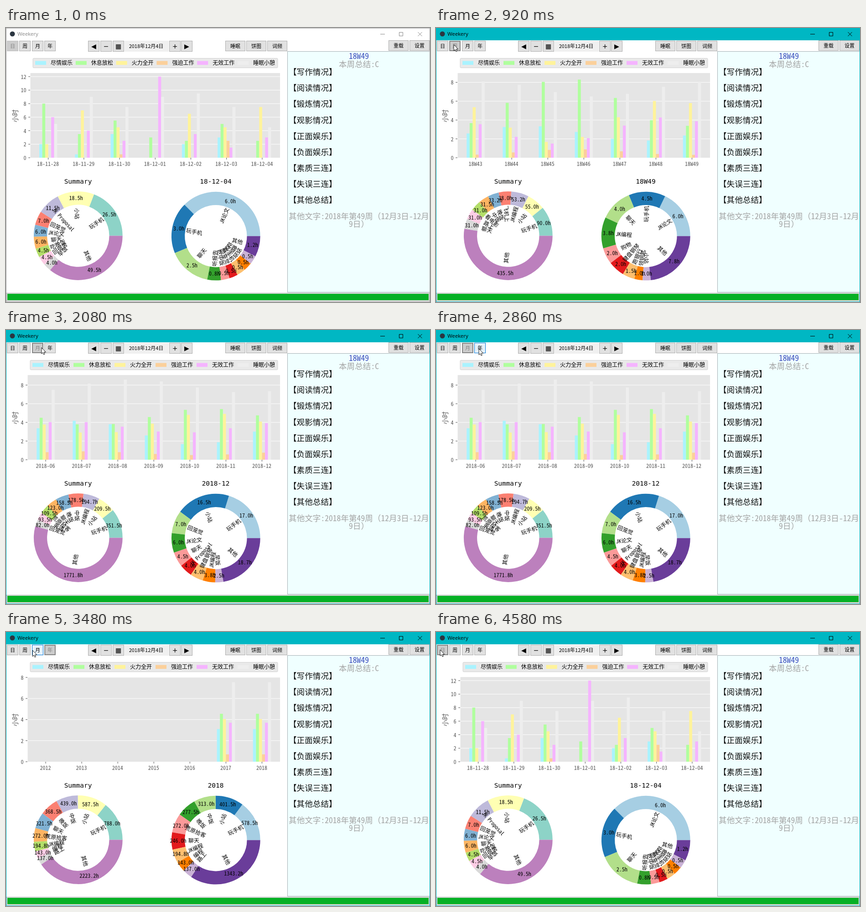
Recreate the animation shown at these times as an HTML page. Size 930 px wide and 602 px high, loop 5590 ms.

```html
<!DOCTYPE html>
<html lang="zh">
<head>
<meta charset="utf-8">
<title>Weekery</title>
<style>
html, body { margin: 0; width: 100%; height: 100%; overflow: hidden; background: #fff; }
svg { display: block; font-family: "Noto Sans Mono CJK SC", "Noto Sans CJK SC", sans-serif; }
.ui { font-family: "Noto Sans CJK SC", "DejaVu Sans", sans-serif; }
.thin { font-family: "Noto Sans CJK SC", sans-serif; font-weight: 300; }
.sym { font-family: "DejaVu Sans", sans-serif; }
.title { font-family: "Open Sans", sans-serif; }
.head { font-family: "DejaVu Sans Mono", monospace; }
</style>
</head>
<body>
<script>
const LOOP = 5590;
const BAR_COLORS = ['#aaf3ff', '#b0ff9e', '#fff39b', '#fbd09b', '#f5b4ff', '#eee'];
const KINDS = ['尽情娱乐', '休息放松', '火力全开', '强迫工作', '无效工作', '睡眠小憩'];
const SET3 = ['#8dd3c7', '#ffffb3', '#bebada', '#fb8072', '#80b1d3', '#fdb462', '#b3de69', '#fccde5', '#d9d9d9', '#bc80bd'];
const PAIRED = ['#a6cee3', '#1f78b4', '#b2df8a', '#33a02c', '#fb9a99', '#e31a1c', '#fdbf6f', '#ff7f00', '#cab2d6', '#6a3d9a'];

// Hours of each kind swing around a mean: [mean, swing, period of the peak]
const waves = list => i => list.map(([mean, swing, peak]) => mean + swing * Math.cos(i - peak));
const days = [[2, 8, 2, 0, 6, 5], [.5, 3.5, 7, 0, 4, 9], [3.5, 5.5, 4.5, .5, 2.5, 7.5], [0, 3, 0, 0, 12, 9],
  [2, 2.5, 6.5, 0, 3.5, 9.5], [3, 5, 4.5, 2.5, 1.5, 7.5], [0, 2.5, 7.5, 0, 3, 4.5]];
const weeks = waves([[2.6, .8, 1.6], [5.9, 2.6, 2.6], [3.9, 2.3, 5.4], [.6, .3, 2.7], [2.9, 1.4, 5.2], [7.3, .8, 0]]);
const months = waves([[2.9, 1.3, 1.2], [4.6, .9, 4.6], [3.9, 1.1, 4.6], [.7, .2, 1], [3.5, .6, .5], [7.9, .7, 2.2]]);
const years = i => i < 5 ? [] : [3.1, 4.55, 4.05, .7, 3.7, 7.55];

// One entry per view: day, week, month, year
const VIEWS = [
  {
    left: 53.5, unit: 14.85, bars: i => days[i],
    tick: i => '18-' + (i < 3 ? `11-${28 + i}` : `12-0${i - 2}`),
    total: '玩手机 26.5,小站 18.5,JK Proposal 11.5,回笼觉 7.0,JK论文 6.0,聊天 6.0,吃晚饭 4.5,回宿舍 4.5,早饭 4.0,其他 49.5',
    title: '18-12-04',
    part: 'JK论文 6.0,玩手机 3.0,聊天 2.5,听报告 0.8,吃中饭 0.5,回笼觉 0.5,看手机 0.5,吃早饭 0.5,吃晚饭 0.5,其他 1.2'
  },
  {
    left: 47.5, unit: 20.7, bars: weeks,
    tick: i => `18W${43 + i}`,
    total: '玩手机 90.0,小站 55.0,JK编程 53.2,飞机上 38.0,晚饭 33.2,中饭 31.5,看电影 31.0,路上 31.0,聊天 31.0,其他 435.5',
    title: '18W49',
    part: 'JK论文 6.0,玩手机 4.5,聊天 4.0,JK编程 3.8,购物 2.0,键盘钢琴 2.0,跑银行 1.5,领钥匙 1.0,小站 1.0,其他 7.8'
  },
  {
    left: 47.5, unit: 20.5, bars: months,
    tick: i => '2018-' + String(6 + i).padStart(2, 0),
    total: '玩手机 351.5,小站 209.5,JK编程 194.7,中饭 178.5,晚饭 158.5,聊天 123.0,荒原拾客 109.5,英语 93.5,回笼觉 82.0,其他 1771.8',
    title: '2018-12',
    part: '玩手机 17.0,小站 16.5,回笼觉 7.0,JK论文 6.0,聊天 4.5,JK Proposal 4.0,键盘钢琴 4.0,JK编程 3.8,早饭 2.5,其他 18.7'
  },
  {
    left: 47.5, unit: 23.15, bars: years,
    tick: i => 2012 + i,
    total: '玩手机 788.0,小站 587.5,中饭 439.0,晚饭 368.5,聊天 321.5,荒原拾客 272.0,JK编程 194.8,编程 143.0,路上 137.0,其他 2223.2',
    title: '2018',
    part: '玩手机 578.5,小站 401.5,中饭 313.0,晚饭 277.5,荒原拾客 272.0,聊天 246.0,JK编程 194.8,编程 143.0,路上 137.0,其他 1343.2'
  }
];

// Each click opens the next view: press, then bars, then pies
const CLICKS = [
  { press: 450, bars: 770, pies: 920 },
  { press: 1460, bars: 1620, pies: 1770 },
  { press: 2940, bars: 3100, pies: 3240 },
  { press: 4270, bars: 4420, pies: 4580 }
];
const clicksDone = (stage, t) => CLICKS.filter(c => c[stage] <= t).length;

// Pointer trips: start, end, goal
const TRIPS = [[70, 300, 39, 36.5], [1080, 1310, 66, 37], [2080, 2460, 94, 41], [3410, 3800, 9, 39]];
const STEP = 76;

function pointer(t) {
  let x = -2, y = 30;
  for (const [start, end, goalX, goalY] of TRIPS) {
    if (t < start) break;
    const steps = Math.floor((end - start) / STEP) + 1;
    const p = Math.min(1, (Math.floor((t - start) / STEP) + 1) / steps);
    const eased = 1 - (1 - p) ** 3;
    x += (goalX - x) * eased;
    y += (goalY - y) * eased;
  }
  return [x, y];
}

function el(tag, attrs, parent, content) {
  const node = document.createElementNS('http://www.w3.org/2000/svg', tag);
  for (const k in attrs) node.setAttribute(k, attrs[k]);
  if (content !== undefined) node.textContent = content;
  parent.append(node);
  return node;
}
const rect = (g, x, y, width, height, fill, more) => el('rect', { x, y, width, height, fill, ...more }, g);
const path = (g, d, more) => el('path', { d, fill: 'none', ...more }, g);

// Text centred vertically on y
function text(g, x, y, str, size, more) {
  return el('text', { x, y, dy: '.37em', 'font-size': size, 'text-anchor': 'middle', ...more }, g, str);
}

function button(x, y, w, h, label, size = 11, cls = 'ui') {
  const box = rect(svg, x + .5, y + .5, w - 1, h - 1, '#e1e1e1', { stroke: '#adadad' });
  const ring = rect(svg, x + 1.5, y + 1.5, w - 3, h - 3, 'none', { visibility: 'hidden' });
  const word = text(svg, x + w / 2, y + h / 2, label, size, { class: cls });
  return { x, w, box, ring, word };
}

function barChart({ left, unit, tick, bars }) {
  const g = el('g', {}, svg), base = 285, right = 601;
  const step = (right - left) / 7, w = step / 12;
  const grey = { fill: '#555' };

  rect(g, left + 5.5, 66.5, 590.5 - left, 21, '#e9e9e9', { stroke: '#d2d2d2', rx: 2 });
  KINDS.forEach((name, i) => {
    const x = 508 - (5 - i) * (left > 50 ? 88.8 : 90);
    rect(g, x, 72.5, 24, 8.5, BAR_COLORS[i]);
    text(g, x + 34, 77, name, 12, { 'text-anchor': 'start' });
  });

  rect(g, left, 99, right - left, base - 99, '#e5e5e5');
  for (let v = 0; v * unit <= 186; v += 2) {
    const y = base - v * unit;
    if (v) path(g, `M${left} ${y}H${right}`, { stroke: '#fff' });
    path(g, `M${left - 4.5} ${y}h4`, { stroke: '#555' });
    text(g, left - 9, y + .5, v, 12, { ...grey, 'text-anchor': 'end' });
  }
  for (let i = 0; i < 7; i++) {
    const x = left + (i + .5) * step;
    bars(i).forEach((v, k) => rect(g, x + (k - 3) * w, base - v * unit, w, v * unit, BAR_COLORS[k]));
    path(g, `M${x} ${base}v4`, { stroke: '#555' });
    text(g, x - .5, 298.5, tick(i), 12, grey);
  }
  return g;
}

function donut(g, cx, cy, title, slices, colors) {
  const items = slices.split(',').map(s => s.match(/(.+) (.+)/).slice(1));
  const sum = items.reduce((total, [, hours]) => total + +hours, 0), R = 97.4, r = 68.2;
  const point = (radius, a) => [cx + radius * Math.cos(a), cy - radius * Math.sin(a)];
  const labels = [];
  let a = 0;
  text(g, cx - .3, 337, title, 14.4, { class: 'head' });
  items.forEach(([name, hours], i) => {
    const size = hours / sum * 2 * Math.PI, b = a + size, mid = a + size / 2, big = +(size > Math.PI);
    path(g, `M${point(R, a)}A${R} ${R} 0 ${big} 0 ${point(R, b)}L${point(r, b)}A${r} ${r} 0 ${big} 1 ${point(r, a)}Z`,
      { fill: colors[i] });
    labels.push([name, point(48.5, mid), (Math.cos(mid) < 0 ? 180 : 0) - mid * 180 / Math.PI],
      [hours + 'h', point(82.8, mid), 0]);
    a = b;
  });
  for (const [str, [x, y], turn] of labels) text(g, x, y, str, 12, { transform: `rotate(${turn} ${x} ${y})` });
}

function pies(v) {
  const g = el('g', {}, svg);
  donut(g, 158.3, 456.5, 'Summary', v.total, SET3);
  donut(g, 460.3, 457.2, v.title, v.part, PAIRED);
  return g;
}

const svg = el('svg', { width: 930, height: 602, viewBox: '0 0 930 602' }, document.body);
rect(svg, 0, 0, 930, 602, '#fff');

// Title bar
const bar = rect(svg, 0, 0, 930, 27, '#fff');
el('circle', { cx: 14, cy: 13, r: 5.5, fill: '#2b3540' }, svg);
const caption = text(svg, 25, 13, 'Weekery', 11.4, { class: 'title', 'text-anchor': 'start' });
const controls = path(svg, 'M821 13.5h10M862.5 9.5h8v8h-8zM903.5 9l9 9m0-9l-9 9');

// Toolbar
const tabs = ['日', '周', '月', '年'].map((s, i) => button(Math.round(2 + 27.3 * i), 28, 25, 23, s));
[['◀', 180], ['−', 207], ['▦', 234], ['+', 358], ['▶', 384]].forEach(([s, x]) => button(x, 28, 25, 24, s, 14, 'sym'));
['睡眠', '饼图', '词频'].forEach((s, i) => button(481 + 46 * i, 28, 44, 23, s));
['重载', '设置'].forEach((s, i) => button(839 + 46 * i, 27, 44, 23, s));
rect(svg, 260, 28, 97, 24, '#f0f0f0');
text(svg, 307.5, 40, '2018年12月4日', 11, { class: 'ui' });

// Notes
rect(svg, 617.5, 51.5, 312, 529, '#f0ffff', { stroke: '#a5b0b5' });
const note = (line, str, fill, more) => text(svg, 774, 61.5 + line * 17.58, str, 17.6, { fill, ...more });
note(0, '18W49', '#3a4cbc');
note(1, '本周总结:C', '#a3a3a3');
['写作情况', '阅读情况', '锻炼情况', '观影情况', '正面娱乐', '负面娱乐', '素质三连', '失误三连', '其他总结']
  .forEach((s, i) => note(2 + 2 * i, `【${s}】`, '#111', { x: 620, 'text-anchor': 'start', class: 'thin' }));
note(20, '其他文字:2018年第49周（12月3日-12月', '#a3a3a3');
note(21, '9日）', '#a3a3a3');

// Progress bar
rect(svg, 0, 581, 930, 21, '#f0f0f0');
rect(svg, 1.5, 582.5, 927, 17, '#e6e6e6', { stroke: '#bcbcbc' });
rect(svg, 3, 584, 924, 14, '#06b025');
const frame = rect(svg, .5, .5, 929, 601, 'none');

const barViews = VIEWS.map(barChart);
const pieViews = VIEWS.map(pies);
text(svg, 20, 193, '小时', 14, { fill: '#555', transform: 'rotate(-90 20 193)' });
const cursor = path(svg, 'M0 0V13.5L3 10.8 5 15.3 7.2 14.3 5.3 10H9.6Z', { fill: '#fff', stroke: '#000', 'stroke-width': .9 });

function paintTab(tab, off, focus, hover) {
  const [fill, stroke] = off ? ['#ccc', focus ? '#999' : '#bfbfbf']
    : focus && hover ? ['#cce4f7', '#005499']
    : hover ? ['#e5f1fb', '#0078d7'] : ['#e1e1e1', '#adadad'];
  tab.box.setAttribute('fill', fill);
  tab.box.setAttribute('stroke', stroke);
  tab.ring.setAttribute('stroke', off ? '#777' : stroke);
  tab.ring.setAttribute('visibility', focus ? 'visible' : 'hidden');
  tab.word.setAttribute('fill', off ? '#838383' : '#000');
}

function draw(now) {
  const t = now % LOOP, presses = clicksDone('press', t), active = presses > 0;
  const view = clicksDone('bars', t) % 4, pie = clicksDone('pies', t) % 4, focus = active ? presses % 4 : -1;
  const [x, y] = pointer(t), ink = active ? '#000' : '#888';
  bar.setAttribute('fill', active ? '#00b7c3' : '#fff');
  frame.setAttribute('stroke', active ? '#00b7c3' : '#aaa');
  caption.setAttribute('fill', ink);
  controls.setAttribute('stroke', ink);
  barViews.forEach((g, i) => g.style.display = i === view ? '' : 'none');
  pieViews.forEach((g, i) => g.style.display = i === pie ? '' : 'none');
  tabs.forEach((b, i) => paintTab(b, i === view, i === focus, x >= b.x && x < b.x + b.w));
  cursor.setAttribute('transform', `translate(${x} ${y})`);
  cursor.style.display = t < TRIPS[0][0] ? 'none' : '';
  requestAnimationFrame(draw);
}
draw(performance.now());
</script>
</body>
</html>
```
